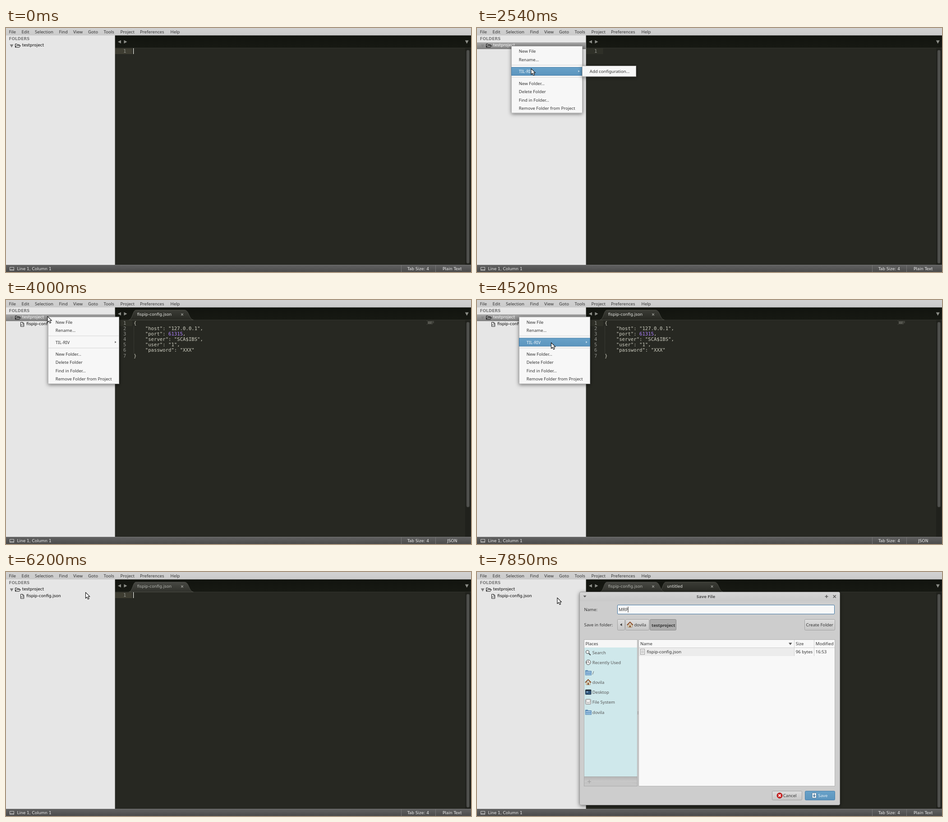
Recreate the animation shown at these times as an HTML page. Size 1031x543 px, loop 7990 ms.

```html
<!DOCTYPE html>
<html lang="en">
<head>
<meta charset="utf-8">
<title>Editor project menu</title>
<style>
html, body { margin: 0; width: 100%; height: 100%; overflow: hidden; background: #272822; }
svg { display: block; width: 100%; height: 100%; }
text { font: 9.55px "Noto Sans", sans-serif; fill: #333; white-space: pre; }
.bar { font-size: 9.65px; }
.b { font-weight: bold; }
.s { font: 9px "DejaVu Sans", sans-serif; fill: #000; }
.h { font: bold 8.9px "DejaVu Sans", sans-serif; fill: #7b7b7b; }
.w { fill: #eee; }
.c { font: 10.65px "DejaVu Sans Mono", monospace; fill: #cfcfc2; }
.n { fill: #8f908a; text-anchor: end; }
.m { text-anchor: middle; }
</style>
</head>
<body>
<svg id="stage" viewBox="0 0 1031 543" preserveAspectRatio="none"></svg>
<script>
const LOOP = 7990;
const stage = document.getElementById('stage');

const text = (x, y, s, cls = '', more = '') => `<text x="${x}" y="${y}" class="${cls}" ${more}>${s}</text>`;
const rect = (x, y, w, h, fill, more = '') => `<rect x="${x}" y="${y}" width="${w}" height="${h}" fill="${fill}" ${more}/>`;
const path = (d, fill = 'none', more = '') => `<path d="${d}" fill="${fill}" ${more}/>`;
const group = (id, body, more = '') => `<g id="${id}" ${more}>${body}</g>`;
const grad = (id, ...stops) => `<linearGradient id="${id}" x2="0" y2="1">` +
  stops.map((c, i) => `<stop offset="${i / (stops.length - 1)}" stop-color="${c}"/>`).join('') + '</linearGradient>';
const line = c => `stroke="${c}"`;
const ink = c => `style="fill:${c}"`;

const defs = `<defs>
  ${grad('bar', '#d2d2d2', '#cacaca')}${grad('strip', '#12140f', '#171913')}
  ${grad('status', '#626262', '#4b4b4b')}${grad('row', '#a9a9a9', '#7e7e7e')}
  ${grad('tabOn', '#3b3c36', '#272822')}${grad('tabOff', '#474843', '#30312b')}
  ${grad('btn', '#dedede', '#c6c6c6')}${grad('blue', '#68a1c8', '#5c95be')}
  ${grad('foot', '#b5b5b5', '#c9c9c9', '#b3b3b3')}${grad('folder', '#4f83b5', '#9cc3e2')}
  <filter id="shadow" x="-20%" y="-60%" width="140%" height="220%">
    <feDropShadow dx="0" dy="2" stdDeviation="4.2" flood-color="#000" flood-opacity=".5"/>
  </filter>
  <clipPath id="side"><rect y="17" width="241" height="510"/></clipPath>
</defs>`;

// Main window
const menuBar = rect(0, 0, 1031, 16.5, 'url(#bar)') +
  [['File', 6.5], ['Edit', 34.5], ['Selection', 64], ['Find', 117.5], ['View', 149], ['Goto', 182],
   ['Tools', 216.5], ['Project', 253.5], ['Preferences', 297], ['Help', 364.5]]
    .map(([s, x]) => text(x, 12.2, s, 'bar')).join('');

const fileIcon = path('M32.5 49.5h4.5l2.7 2.7v6.8h-7.2zM37 49.5v2.7h2.7M35 54l-1 1.4 1 1.4M37.2 54l1 1.4-1 1.4', 'none', line('#222'));

const sidebar = rect(0, 16, 242, 511, '#e6e6e6') +
  group('picked', rect(0, 32, 242, 15, 'url(#row)')) +
  text(6.5, 27, 'FOLDERS', 'h') +
  path('M8.5 36.5h8l-4 7z', '#7c7c7c', 'id="twist"') +
  path('M20.5 43V35.5h3.5l1 1.5h4.5v2M20.5 43l2.8-4h9l-2.8 4z', 'none', line('#111')) +
  text(35.8, 41, 'testproject', 's', 'id="project"') +
  `<g clip-path="url(#side)">${group('file', fileIcon + text(45.3, 56, 'fispip-config.json', 's'))}</g>`;

const tab = (id, dx, name) => group(id,
  path('M272.5 44.5C281 43 281 22.5 288 22.5H396C406 22.5 405 43 415.5 44.5z', 'url(#tabOn)', 'stroke="#55564f" stroke-width=".8"') +
  text(290.8, 34.5, name, 's w') +
  path('M388.3 30l4.5 4.5m0-4.5l-4.5 4.5', 'none', 'stroke="#999a94" stroke-width="1.2"'),
  `transform="translate(${dx})"`);

const strip = rect(242, 16, 789, 29, 'url(#strip)') + rect(242, 44, 789, 1, '#34352f') +
  path('M255 27v7.5l-7-3.75zM261.5 27v7.5l7-3.75zM1017.8 27.5h8l-4 7.5z', '#8b8d87') +
  tab('tab2', 130.5, 'untitled') + tab('tab1', 0, 'fispip-config.json');

const lineY = i => 55.2 + i * 12.05;
const code = ['{', '"host": "127.0.0.1",', '"port": <tspan fill="#ae81ff">61315</tspan>,', '"server": "SCA$IBS",',
  '"user": "1",', '"password": "XXX"', '}'];
const json = code.map((s, i) =>
  text(i % 6 ? 308.8 : 283, lineY(i), s, 'c') + (i ? text(266.5, lineY(i), i + 1, 'c n') : '') +
  rect(i % 6 ? 935 : 933, 46 + i * 1.3, i % 6 ? [0, 14, 9, 14, 8, 11][i] : 1, .9, '#6b6c64')).join('') +
  path('M283.5 59V118', 'none', 'stroke="#4a4b43" stroke-dasharray="1 1"') +
  group('braces', path('M283 57.5h6M283 130h6', 'none', line('#d8d8b0')));

const editor = rect(242, 45, 789, 482, '#272822') + rect(241, 16, 1, 511, '#a2a2a0') +
  rect(242, 45.5, 37.5, 12.5, '#3e3d32', 'id="gutter"') +
  text(266.5, lineY(0), 1, 'c n') + group('json', json) +
  rect(282, 45, 1.2, 13, '#f8f8f0', 'id="caret"') +
  rect(1018, 45, 13, 482, '#20211c') +
  rect(1021, 49, 6.5, 475, '#50514e', 'id="thumb" rx="3" stroke="#383934"');

const statusBar = rect(0, 527, 1031, 16, 'url(#status)') + rect(0, 527, 1031, 1, '#777') +
  path('M8.5 532.5h9v7h-9zM8.5 537.5h9', 'none', line('#ccc')) +
  path('M876.5 528v15M952.5 528v15', 'none', line('#777')) +
  text(24.5, 538.5, 'Line 1, Column 1', 's w') + text(913.8, 538.5, 'Tab Size: 4', 's w m') +
  text(989.3, 538.5, '', 's w m', 'id="syntax"');

// Context menus, drawn at their own origin
const ITEM = 18.4;
const tops = [2, 20.4, 47, 73.5, 91.9, 110.3, 128.7];
const labels = ['New File', 'Rename...', 'TIL-RIV', 'New Folder...', 'Delete Folder', 'Find in Folder...', 'Remove Folder from Project'];
const subLabels = ['Open configuration...', 'New procedure', 'Get element...', 'Run query...'];

const popup = (w, h, names, ys, hover) => rect(.5, .5, w, h, '#f7f7f7', 'stroke="#b5b5b5" filter="url(#shadow)"') +
  names.map((s, i) => (i === hover ? rect(.5, Math.floor(ys[i]) + .5, w, 18, 'url(#blue)', line('#3c78a5')) : '') +
    text(16.8, ys[i] + 13.2, s, '', i === hover ? ink('#f4f8fb') : '')).join('');

const itemAt = (y, ys) => ys.findIndex(top => y >= top && y < top + ITEM);

function menuView(m, x, y, open) {
  const ys = m.sub.map((_, i) => 2.5 + i * ITEM);
  const inSub = open && x > m.x + 157;
  const over = inSub ? 2 : x > m.x + 1 ? itemAt(y - m.y, tops) : -1;
  const arrow = path('M148.5 54v4.5l3-2.25z', over === 2 ? '#d6e6f2' : '#555');
  const seps = path('M1 42.5h156M1 69.5h156', 'none', line('#d4d4d4'));
  const sub = open ? `<g transform="translate(157 44)">${popup(m.w, 5 + m.sub.length * ITEM, m.sub, ys,
    inSub ? itemAt(y - m.y - 44, ys) : -1)}</g>` : '';
  return `<g transform="translate(${m.x} ${m.y})">${popup(157, 148.5, labels, tops, over)}${seps}${arrow}${sub}</g>`;
}

const menus = [
  { from: 1760, to: 3290, opens: 2540, x: 76, y: 40, w: 119, sub: ['Add configuration...'], hold: 3290 },
  { from: 4000, to: 6200, opens: 4560, x: 93, y: 37.4, w: 126, sub: subLabels, hold: 5480 }
];

// Save dialog
const button = (x, y, w, h, fill = 'url(#btn)', edge = '#a2a2a2') => rect(x + .5, y + .5, w, h, fill, `rx="2" stroke="${edge}"`);
const home = (x, y) => path(`M${x + 2} ${y + 6}h9v6h-9z`, '#e9d9bd', 'stroke="#8a6a48" stroke-width=".7"') +
  path(`M${x} ${y + 7}l6.5-6.5 6.5 6.5`, 'none', 'stroke="#8b4a22" stroke-width="1.8"') + rect(x + 5, y + 8, 3, 4, '#7a4a2b');
const folder = (x, y) => path(`M${x} ${y + 1}h5l1 1.5h7v9H${x}z`, 'url(#folder)', 'stroke="#4779a5" stroke-width=".7"') +
  rect(x + 1, y + 4, 11, 1, '#dcecf7');
const places = [['Search', 183], ['Recently Used', 204.7], ['/', 227.5], ['dovila', 249.3], ['Desktop', 271], ['File System', 292.8], ['dovila', 316]];
const placeIcons = '<circle cx="245" cy="178" r="3.6" fill="#eef5f6" stroke="#444"/>' + path('M247.8 181l4 4', 'none', 'stroke="#444" stroke-width="1.8"') +
  '<circle cx="246.8" cy="201" r="5.3" fill="#f3f3f3" stroke="#444"/>' + path('M246.8 197.5v3.5l3 2M243.5 199v4', 'none', line('#444')) +
  folder(240.5, 218) + home(240, 239) + rect(240.5, 262, 12.5, 10.5, '#2f557b', 'rx="1" stroke="#26303a"') + rect(241, 262, 11.5, 2.5, '#26303a') +
  rect(242.5, 266, 4, 2, '#9fc1de') + rect(240.5, 283, 12, 11.5, '#d9d9d9', 'rx="2" stroke="#888"') +
  '<ellipse cx="246.5" cy="287" rx="4.5" ry="3" fill="#f4f4f4" stroke="#aaa"/>' + folder(240.5, 306);

const nameRow = text(237.5, 87.3, 'Name:') + rect(311.5, 73.5, 481, 20, '#f8f8f8', 'rx="1.5" stroke="#3f75a2"') + group('entry', '');

const pathRow = text(237.5, 121, 'Save in folder:') +
  button(311, 105, 16, 24) + path('M321.5 114v6.5l-4.5-3.25z', '#444') +
  button(329, 105, 52, 24) + home(332.8, 111) + text(348.5, 121, 'dovila') +
  button(383, 105, 58, 24, '#adadad', '#888') + text(387, 121.5, 'testproject', 'b') +
  button(726, 105, 67, 24) + text(759.7, 121, 'Create Folder', 'm');

const placesPane = rect(237.5, 150.5, 118, 326, '#cfe8eb', line('#b2b2b2')) + rect(238, 151, 117, 17, '#f6f6f6') + text(240.5, 163, 'Places') +
  places.map(([s, y]) => text(255.8, y, s, '', ink('#555'))).join('') + placeIcons +
  rect(237.5, 455.5, 118, 21, 'url(#foot)', line('#aaa')) + path('M238 471Q297 461 355 471V476H238z', '#c6c6c6') +
  path('M245 466.5h8M249 462.5v8', 'none', line('#999')) +
  path('M355.5 311h3M355.5 313.5h3M355.5 316h3', 'none', line('#999'));

const filesPane = rect(358.5, 150.5, 435, 326, '#f8f8f8', line('#b2b2b2')) + path('M359 168.5h434M703.5 151v36M747.5 151v36', 'none', line('#d0d0d0')) +
  rect(359, 169, 344, 18, '#ececec') +
  text(362, 163, 'Name') + path('M691 157.5h7.5l-3.75 5z', '#555') + text(706.8, 163, 'Size') + text(750.8, 163, 'Modified') +
  rect(362.5, 171.5, 9, 12, '#f2f2f2', line('#999')) + path('M364.5 175h5M364.5 177.5h5M364.5 180h5', 'none', 'stroke="#888" stroke-dasharray="2 1"') +
  text(376.5, 181.3, 'fispip-config.json') + text(706.8, 181.3, '96 bytes') + text(750.8, 181.3, '16:53');

const actions = button(654, 487, 66, 20) + '<circle cx="671" cy="497.5" r="6" fill="#cf2424" stroke="#9c1515"/>' +
  path('M668.5 495l5 5m0-5l-5 5', 'none', 'stroke="#fff" stroke-width="1.8"') + text(678.8, 501.3, 'Cancel') +
  button(727, 487, 66, 20, 'url(#blue)', '#4a80ab') + rect(743, 491.5, 9.5, 11.5, '#f1f5f8', 'rx="1" stroke="#48718f"') +
  path('M747.75 493.5v5.5M745.3 497l2.45 2.8 2.45-2.8', 'none', 'stroke="#34678f" stroke-width="1.3"') +
  text(756.5, 501.3, 'Save', '', ink('#e6eff6'));

const dialog = group('dialog',
  rect(227.5, 44.5, 577, 474, '#cdcdcd', 'rx="3" stroke="#9a9a9a" filter="url(#shadow)"') +
  rect(228, 45, 576, 20, 'url(#btn)', 'rx="3" opacity=".5"') +
  path('M235.5 52.5h7l-3.5 4z', '#555') + path('M771.5 54.5h7M775 51v7M789.7 51.5l6 6m0-6l-6 6', 'none', 'stroke="#555" stroke-width="1.5"') +
  text(507.5, 58.3, 'Save File', 'b m', ink('#505050')) +
  group('form', nameRow + pathRow + placesPane + filesPane + actions));

const mouse = path('M0 .3V13.5L3.1 10.7L5.2 15.6L7.6 14.5L5.5 9.8H9.5z', '#fff', 'id="mouse" stroke="#111" stroke-width="1.1" stroke-linejoin="round"');

stage.innerHTML = defs + sidebar + strip + editor + menuBar + statusBar + group('popups', '') + dialog + mouse;

const el = id => document.getElementById(id);
const show = (id, on) => el(id).setAttribute('opacity', +on);
const ramp = (t, a, b) => Math.max(0, Math.min(1, (t - a) / (b - a)));

// Pointer stops: time, x, y
const stops = [[860, 228, 116], [1010, 150, 68], [1150, 98, 27], [1400, 74.5, 40], [1580, 74.5, 40], [1620, 74.5, 38],
  [1940, 74.5, 38], [2120, 92, 58], [2350, 120, 90], [2730, 120, 90], [3100, 262, 98], [3250, 262, 98], [3510, 114.5, 65],
  [3720, 92, 36], [4190, 92, 36], [4520, 164.5, 94.5], [4690, 164.5, 94.5], [4700, 164.5, 93.5], [5170, 164.5, 93.5],
  [5360, 268, 98], [5480, 275, 108], [5760, 69, 41], [5910, 176.5, 45], [6340, 176.5, 45], [6750, 178, 57]];

function pointer(t) {
  const i = stops.findIndex(s => s[0] > t);
  if (i < 0) return stops[stops.length - 1].slice(1);
  if (!i) return stops[0].slice(1);
  const [a, b] = [stops[i - 1], stops[i]], k = ramp(t, a[0], b[0]);
  return [a[1] + (b[1] - a[1]) * k, a[2] + (b[2] - a[2]) * k];
}

function caretAlpha(t) {
  if (t < 780) return 1 - ramp(t, 90, 230);
  if (t < 1760) return ramp(t, 780, 930) - ramp(t, 1250, 1400);
  if (t < 6200) return t >= 3290 && t < 4000;
  return 1 - ramp(t, 6590, 6750);
}

function entryView(t) {
  if (t < 7670) return rect(314, 76.5, 35, 14, '#629cc3') + text(314.3, 87.3, 'untitled', '', ink('#fff'));
  const n = 1 + (t >= 7760) + (t >= 7850);
  return text(314.3, 87.3, 'MRP'.slice(0, n)) + rect([323, 329, 334.5][n - 1], 77, 1, 13, '#222');
}

function setTab(id, active, alpha) {
  show(id, alpha);
  const [shape, label] = el(id).children;
  shape.setAttribute('fill', active ? 'url(#tabOn)' : 'url(#tabOff)');
  label.style.fill = active ? '#e8e8e4' : '#b4b5b0';
}

function draw(t) {
  const [x, y] = pointer(t);
  const menu = menus.find(m => t >= m.from && t < m.to);
  const hasJson = t >= 3380 && t < 6200;

  el('mouse').setAttribute('transform', `translate(${x} ${y})`);
  show('mouse', t >= 860);
  show('picked', !!menu);
  el('project').style.fill = menu ? '#fff' : '#000';
  show('twist', menu ? .5 : 1);
  el('popups').innerHTML = menu ? menuView(menu, ...pointer(Math.min(t, menu.hold)), t >= menu.opens) : '';

  el('file').setAttribute('transform', `translate(${210 * (1 - ramp(t, 3430, 3750))})`);
  show('file', t >= 3430);
  setTab('tab1', t < 6200, ramp(t, 3510, 3710));
  setTab('tab2', true, ramp(t, 6330, 6560));

  show('json', hasJson);
  show('braces', !menu);
  show('gutter', menu ? .4 : 1);
  show('caret', caretAlpha(t));
  el('thumb').setAttribute('height', hasJson ? 412 : 475);
  el('syntax').textContent = hasJson ? 'JSON' : 'Plain Text';

  show('dialog', t >= 7270);
  show('form', t >= 7310);
  el('entry').innerHTML = entryView(t);
}

const start = performance.now();
function tick() {
  draw((performance.now() - start) % LOOP);
  requestAnimationFrame(tick);
}
tick();
</script>
</body>
</html>
```
